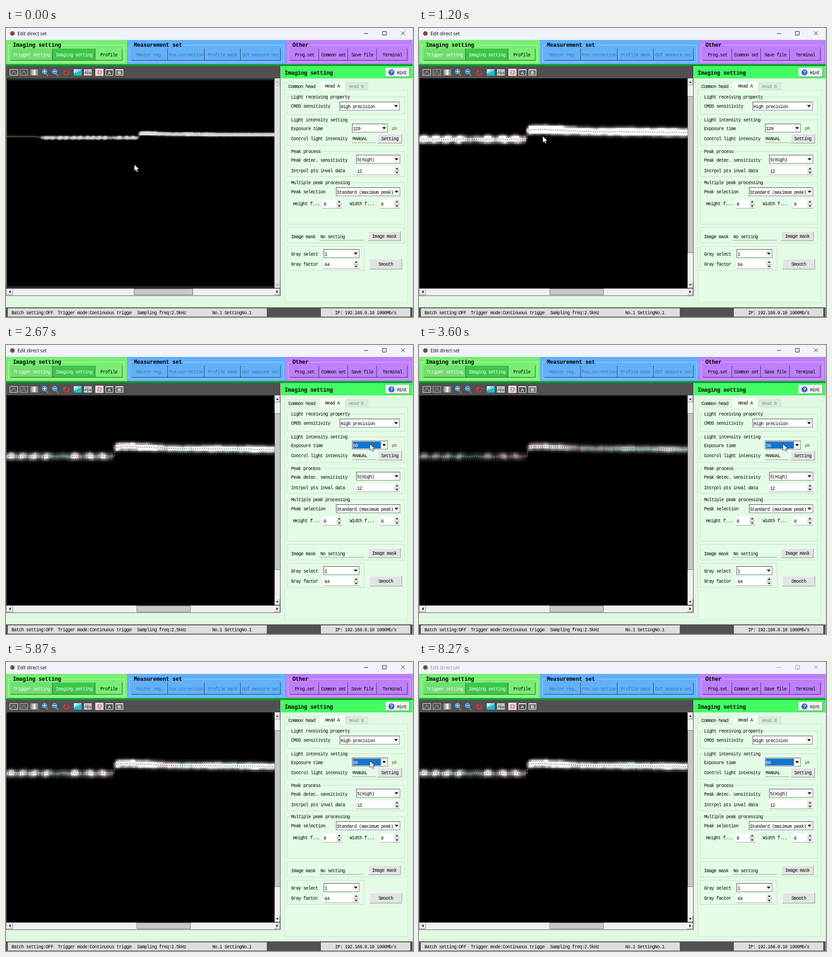
An HTML page with a canvas for the animation above (8340 ms loop, 888 by 631 pixels).

```html
<!DOCTYPE html>
<html lang="en">
<head>
<meta charset="utf-8">
<title>Edit direct set</title>
<style>
  html, body { margin: 0; width: 100%; height: 100%; overflow: hidden; background: #e1f9e3; }
  svg, canvas { position: absolute; left: 0; top: 0; display: block; }
  #view { left: 1px; top: 110px; }
  text { font: 10px "Liberation Mono", monospace; letter-spacing: -.66px; fill: #000; }
  .head { font: bold 12px "Liberation Mono", monospace; letter-spacing: -.2px; }
  .title { font: 10.1px "Open Sans", sans-serif; letter-spacing: 0; }
  .bold { font: bold 9px "Liberation Sans", sans-serif; letter-spacing: 0; }
  rect { shape-rendering: crispEdges; }
  .idle .title { fill: #8c8f94; }
  .idle .control { stroke: #8c8f94; }
</style>
</head>
<body>
<svg id="ui" width="888" height="631"></svg>
<canvas id="view" width="585" height="458"></canvas>
<svg id="cursor" width="14" height="20" viewBox="-1 -1 14 20">
  <path d="M0 0V14.5L3.4 11.4L5.7 16.6L8.1 15.5L5.9 10.5H10.4Z" fill="#fff" stroke="#222" stroke-width=".8"/>
</svg>
<script>
const LOOP = 8340, STEP = 66.7;
const ui = document.getElementById('ui');
const cursor = document.getElementById('cursor');
const ctx = document.getElementById('view').getContext('2d');
let out = '';

// ---- drawing helpers for the window ----
const rect = (x, y, w, h, fill, extra = '') =>
  out += `<rect x="${x}" y="${y}" width="${w}" height="${h}" fill="${fill}" ${extra}/>`;
const path = (d, stroke, fill = 'none', extra = '') =>
  out += `<path d="${d}" stroke="${stroke}" fill="${fill}" ${extra}/>`;
const text = (x, y, s, extra = '') =>
  out += `<text x="${x}" y="${y}" ${extra}>${s}</text>`;
const frame = (x, y, w, h, stroke) => rect(x + .5, y + .5, w - 1, h - 1, 'none', `stroke="${stroke}"`);
const down = (x, y, c = '#000') => path(`M${x - 4} ${y - 2}h8l-4 4.5z`, 'none', c);
const up = (x, y, c = '#000') => path(`M${x - 3} ${y + 1.5}h6l-3 -3z`, 'none', c);

function bevel(x, y, w, h, fill, light, dark) {
  rect(x, y, w, h, dark);
  rect(x, y, w - 1, h - 1, light);
  rect(x + 1, y + 1, w - 2, h - 2, fill);
}
function button(x, y, w, h, label, fill = '#e1e5e1', light = '#f8faf8', dark = '#8b918b', ink = '#000') {
  bevel(x, y, w, h, fill, light, dark);
  text(x + w / 2, y + h / 2 + 3.5, label, `text-anchor="middle" style="fill:${ink}"`);
}
function group(x, y, w, h, label, bg) {
  frame(x, y, w, h, '#c9dccb');
  if (!label) return;
  rect(x + 6, y, label.length * 5.35 + 6, 1, bg);
  text(x + 9, y + 4, label);
}
function field(x, y, w, h) {
  rect(x, y, w, h, '#fff');
  rect(x, y + h - 1, w, 1, '#9aa59b');
}
function combo(x, y, w, h, label, id = '') {
  bevel(x, y, w, h, '#fff', '#444', '#777');
  rect(x + w - 15, y + 2, 13, h - 4, '#f3f3f3');
  down(x + w - 8, y + h / 2);
  if (id) rect(x + 2, y + 2, w - 17, h - 4, '#1673cc', 'id="mark"');
  text(x + 2, y + h / 2 + 4, label, id && `id="${id}"`);
}
function spin(x, y, w, h, label) {
  field(x, y, w, h);
  rect(x + w - 13, y + 1, 12, h - 2, '#e6e9e6');
  rect(x + w - 13, y + h / 2, 12, 1, '#aaa');
  up(x + w - 7, y + 5);
  path(`M${x + w - 10} ${y + h - 6.5}h6l-3 3z`, 'none', '#000');
  text(x + 2, y + h / 2 + 4, label);
}

// ---- title bar ----
const BG = '#e1f9e3';
rect(0, 0, 888, 631, BG);
rect(0, 0, 888, 26, '#f0f3f9');
out += '<circle cx="14" cy="12" r="5" fill="#7b4a48"/>';
text(25, 16, 'Edit direct set', 'class="title"');
path('M781 12h9M821.5 7.5h8v8h-8zM862 7.5l8 8m0 -8l-8 8', '#111', 'none', 'class="control"');

// ---- menu groups ----
function menu(x, w, fill, gx, gw, line, label, items) {
  rect(x, 26, w, 54, fill);
  frame(gx, 37, gw, 38, line);
  rect(gx + 8, 36, label.length * 7 + 5, 3, fill);
  text(gx + 10, 41, label, 'class="head"');
  for (const [bx, bw, name, face = fill, ink] of items)
    button(bx, 45, bw, 26, name, face, face, '#0009', ink);
}
menu(0, 264, '#78ee73', 5, 254, '#c5f8c0', 'Imaging setting', [
  [10, 92, 'Trigger setting', '#71dc70', '#f4fff4'],
  [102, 93, 'Imaging setting', '#3dc64a', '#f4fff4'],
  [195, 59, 'Profile']]);
const blue = '#62b0f9', dim = '#3d78ab';
menu(264, 346, blue, 269, 337, '#a9d5ff', 'Measurement set', [
  [274, 79, 'Master reg.', blue, dim], [353, 80, 'Pos.correction', blue, dim],
  [433, 79, 'Profile mask', blue, dim], [512, 87, 'OUT measure set', blue, dim]]);
menu(610, 278, '#bd7ffb', 615, 267, '#dfc2ff', 'Other', [
  [620, 63, 'Prog.set'], [683, 63, 'Common set'], [746, 63, 'Save file'], [810, 66, 'Terminal']]);
rect(0, 79, 888, 4, '#0c9c26');

// ---- image tool bar ----
rect(0, 83, 599, 27, '#505050');
for (const [x, edge, curve] of [[8, '#eee', '#f0a9ae'], [30, '#bbb', '#b6c47b']]) {
  bevel(x, 90, 18, 14, '#555', edge, edge);
  path(`M${x + 2} 101q4 0 5 -5q2 -4 4 0q1 5 5 5`, curve);
}
rect(53, 90, 17, 14, '#888'); rect(56, 91, 4, 12, '#bbb'); rect(60, 91, 4, 12, '#eee'); rect(64, 91, 3, 12, '#aaa');
for (const x of [84, 106]) {
  path(`M${x + 3} 99l5 6`, '#b87a34', 'none', 'stroke-width="2.4"');
  out += `<circle cx="${x}" cy="95" r="5" fill="#1587e6" stroke="#bfe1ff"/>`;
  path(`M${x - 3} 95h6${x < 90 ? 'M84 92v6' : ''}`, '#fff', 'none', 'stroke-width="1.5"');
}
path('M127 94a5.5 5.5 0 1 0 8 -1', '#d43b39', 'none', 'stroke-width="2.5"');
path('M124 94l7 -3v6z', 'none', '#d43b39');
rect(148, 90, 17, 14, '#e5f6f6');
path('M148 104v-5h2v-4h2v3h2v-6h2v4h2v-7h2v5h2v-3h3v13z', 'none', '#18bfc9');
rect(170, 90, 17, 14, '#c9c9c9');
path('M170 98.5h17M174.5 98v-5M178.5 103v-11M183.5 102v-7', '#444');
bevel(195, 89, 18, 16, '#e9dddd', '#fff', '#aaa');
out += '<circle cx="204" cy="97" r="5.5" fill="#c77c7c"/>';
path('M199 95l10 4M201 101l6 -8M204 92v10', '#fff');
for (const [x, s] of [[217, 'A'], [239, 'B']]) {
  bevel(x, 90, 17, 14, s === 'A' ? '#555' : '#777', '#eee', '#eee');
  rect(x, 90, 17, 2, '#eee');
  text(x + 8.5, 101, s, 'class="bold" text-anchor="middle" style="fill:#fff"');
}

// ---- scroll bars ----
rect(0, 110, 1, 474, '#777');
rect(586, 110, 12, 458, '#f0f0f0');
rect(586, 149, 12, 341, '#c6c6c6', 'id="vthumb" stroke="#777"');
bevel(586, 111, 12, 14, '#e7e7e7', '#fff', '#888'); up(592, 118);
bevel(586, 554, 12, 14, '#e7e7e7', '#fff', '#888'); path('M589 559.5h6l-3 3z', 'none', '#000');
rect(586, 110, 12, 458, '#d8d8d8aa', 'id="voff"');
rect(1, 569, 597, 15, '#f0f0f0');
rect(0, 568, 599, 1, '#222');
rect(0, 584, 599, 1, '#555');
rect(598, 110, 1, 475, '#505050');
bevel(1, 569, 14, 14, '#e7e7e7', '#fff', '#888'); path('M10 573v6l-3.5 -3z', 'none', '#000');
bevel(585, 569, 13, 14, '#e7e7e7', '#fff', '#888'); path('M590 573v6l3.5 -3z', 'none', '#000');
rect(285, 569.5, 117, 13, '#c8c8c8', 'id="hthumb" stroke="#777"');

// ---- settings panel ----
rect(600, 83, 288, 27, '#43fb63');
text(608, 102, 'Imaging setting', 'class="head"');
bevel(828, 87, 53, 20, '#f1f1f4', '#fff', '#777');
out += '<circle cx="841" cy="97" r="6.5" fill="#2961c4"/>';
text(841, 101, '?', 'class="bold" text-anchor="middle" style="fill:#fff;font-size:11px"');
text(853, 101, 'Hint');

const PANE = '#e4fbe6';
rect(608, 135, 269, 465, PANE); frame(608, 135, 269, 465, '#cfe3d1');
rect(608, 119, 76, 16, BG); frame(608, 119, 77, 17, '#cfe0d0');
rect(740, 119, 50, 16, '#d9eddb'); frame(740, 119, 50, 17, '#c8dbc9');
rect(684, 117, 56, 19, '#f4fef5');
text(616, 131, 'Common head'); text(696, 130, 'Head A');
text(748, 131, 'Head B', 'style="fill:#8b978c"');

group(613, 150, 257, 39, 'Light receiving property', PANE);
text(622, 174, 'CMOS sensitivity'); combo(728, 161, 131, 19, 'High precision');

group(613, 200, 257, 57, 'Light intensity setting', PANE);
text(622, 223, 'Exposure time'); combo(755, 209, 78, 19, '120', 'exposure');
text(842, 222, '&#181;s', 'style="fill:#3f5c0c"');
text(622, 245, 'Control light intensity');
rect(755, 250, 53, 1, '#8f9b90'); text(756, 245, 'MANUAL');
button(811, 231, 53, 21, 'Setting');

group(613, 269, 257, 56, 'Peak process', PANE);
text(622, 292, 'Peak detec. sensitivity'); combo(764, 277, 96, 19, '5(High)');
text(622, 315, 'Intrpol pts inval data'); spin(764, 302, 96, 19, '12');

group(613, 337, 257, 92, 'Multiple peak processing', PANE);
text(622, 361, 'Peak selection'); combo(720, 348, 140, 19, 'Standard (maximum peak)');
text(626, 387, 'Height f...'); spin(691, 374, 43, 20, '0');
text(750, 387, 'Width f...'); spin(816, 374, 44, 20, '0');

group(613, 435, 257, 35);
text(622, 459, 'Image mask'); rect(684, 463, 97, 1, '#8f9b90'); text(686, 459, 'No setting');
button(790, 444, 71, 21, 'Image mask');

group(613, 476, 169, 54);
text(622, 497, 'Gray select'); combo(693, 483, 78, 19, '1');
text(622, 519, 'Gray factor'); spin(693, 506, 78, 20, '64');
button(793, 504, 71, 23, 'Smooth');

// ---- status bar ----
rect(0, 610, 888, 21, '#525252');
rect(4, 612, 565, 18, '#dedede');
rect(687, 612, 195, 18, '#dedede');
text(12, 625, 'Batch setting:OFF');
out += '<clipPath id="cut"><rect x="110" y="610" width="165" height="21"/></clipPath>';
text(113, 625, 'Trigger mode:Continuous trigger', 'clip-path="url(#cut)"');
text(286, 625, 'Sampling freq:2.5kHz');
text(450, 625, 'No.1 SettingNo.1');
text(718, 625, 'IP: 192.168.0.10 1000Mb/s');
rect(887, 0, 1, 631, '#c9ccd2');
ui.innerHTML = out;

// ---- live profile image, in unzoomed coordinates ----
const EDGE = 291, CELL_X = 2.7, CELL_Y = 2;
const BUMPS = [88, 101, 118, 131, 148, 161, 178, 190, 202, 216, 247, 264, 278];
const clamp = v => Math.max(0, Math.min(1, v));
const bell = (d, s) => Math.exp(-d * d / (s * s));
const hash = (a, b) => {
  const v = Math.sin(a * 127.1 + b * 311.7) * 43758.5453;
  return v - Math.floor(v);
};
const cells = document.createElement('canvas');
cells.width = 585;
cells.height = 458;
const cellCtx = cells.getContext('2d');

function centre(x) {
  if (x < EDGE - 1)
    return 237 + 2.6 * clamp((x - 60) / 22) + .35 * Math.sin(x * .45) * clamp((x - 70) / 20);
  return 229.7 + 2.2 * clamp((x - 305) / 55) + .8 * clamp((x - 400) / 60)
    + 1.2 * clamp((299 - x) / 8) + .2 * Math.sin(x * .4);
}
function strength(x) {
  if (x < 76) return .03;
  if (x < EDGE) return .22 + .42 * BUMPS.reduce((sum, b) => sum + bell(x - b, 4.2), 0);
  return .56 + .4 * clamp((340 - x) / 12) + .28 * bell(x - 401, 9) + .3 * bell(x - 442, 13);
}
function drawImage(zoomed, exposure, tick) {
  const toX = x => zoomed ? 237 + (x - EDGE) * 2 : x - 1;
  const toY = y => zoomed ? 134 + (y - 240) * 2.2 : y - 110;
  const spread = zoomed ? 3.1 : 2.8;
  const first = zoomed ? 170 : 0, last = zoomed ? 468 : 588;
  cellCtx.fillStyle = '#000';
  cellCtx.fillRect(0, 0, 585, 458);
  for (let col = Math.floor(first / CELL_X); col * CELL_X < last; col++) {
    const x = col * CELL_X, mid = centre(x + CELL_X / 2);
    const flicker = .95 + .1 * hash(col, tick);
    const power = strength(x + CELL_X / 2) * (.85 + .3 * hash(col, 7)) * flicker * exposure / 30;
    const x0 = Math.round(toX(x)), x1 = Math.round(toX(x + CELL_X));
    for (let row = Math.floor((mid - 8) / CELL_Y); row * CELL_Y < mid + 8; row++) {
      const y = row * CELL_Y;
      const v = Math.round(255 * clamp(power * bell(y + CELL_Y / 2 - mid, spread)));
      if (v < 4) continue;
      const y0 = Math.round(toY(y)), y1 = Math.round(toY(y + CELL_Y));
      cellCtx.fillStyle = `rgb(${v},${v},${v})`;
      cellCtx.fillRect(x0, y0, x1 - x0, y1 - y0);
    }
  }
  ctx.filter = 'blur(1px)';
  ctx.drawImage(cells, 0, 0);
  ctx.filter = 'none';
  if (!zoomed) {
    ctx.fillStyle = '#2b2b2b';
    ctx.fillRect(0, 0, 585, 4);
    ctx.fillRect(0, 454, 585, 4);
  }
  const dot = (x, y, color) => {
    ctx.fillStyle = color;
    ctx.fillRect(toX(x) - .8, toY(y) - 1, zoomed ? 1.6 : 1.3, zoomed ? 2.4 : 1.6);
  };
  for (let x = first, i = 0; x < last; x += 2.4, i++) {
    const red = zoomed ? (x > 246 && x < 350 && i % 5) : i % 3;
    const bright = strength(x) * exposure / 30 < .75;
    dot(x, centre(x), red ? (bright ? '#f04a35' : '#cf4636') : (bright ? '#4fd08a' : '#358a58'));
  }
  for (let k = 1; k < 5; k++)
    dot(289.6 + k * .4, 239.6 - k * 1.8, k % 2 ? '#3f9c4c' : '#c9a23b');
}

// ---- timeline ----
const ease = p => p * p * (3 - 2 * p);
const MOVES = [
  [70, 470, 280, 298, 270, 236],
  [1270, 1740, 270, 236, 794, 216],
  [6530, 6800, 794, 216, 905, 206]
];
function cursorAt(t) {
  let x = 280, y = 298;
  for (const [from, to, x0, y0, x1, y1] of MOVES) {
    if (t < from) break;
    const p = ease(clamp((t - from) / (to - from)));
    x = x0 + (x1 - x0) * p;
    y = y0 + (y1 - y0) * p;
  }
  return [x, y];
}
const exposureAt = t => t < 2330 ? 120 : t < 3070 ? 60 : t < 5070 ? 30 : 60;
const el = id => document.getElementById(id);
const parts = { exposure: el('exposure'), mark: el('mark'), hthumb: el('hthumb'), vthumb: el('vthumb'), voff: el('voff') };
const show = (node, on) => node.style.visibility = on ? 'visible' : 'hidden';
let shown = -1;

function tickTo(t) {
  const tick = Math.floor(t / STEP + .02);
  if (tick === shown) return;
  shown = tick;
  const zoomed = t >= 600, exposure = exposureAt(t), marked = t >= 2000;
  drawImage(zoomed, exposure, tick);
  const [x, y] = cursorAt(t);
  cursor.style.transform = `translate(${x - 1}px,${y - 1}px)`;
  show(cursor, t < 6800);
  parts.exposure.textContent = exposure;
  parts.exposure.style.fill = marked ? '#fff' : '#000';
  show(parts.mark, marked);
  show(parts.vthumb, zoomed);
  show(parts.voff, !zoomed);
  parts.hthumb.setAttribute('x', zoomed ? 285 : 279);
  parts.hthumb.setAttribute('width', zoomed ? 117 : 128);
  ui.classList.toggle('idle', t >= 8070);
}
const start = performance.now();
function run() {
  tickTo((performance.now() - start) % LOOP);
  requestAnimationFrame(run);
}
run();
</script>
</body>
</html>
```
